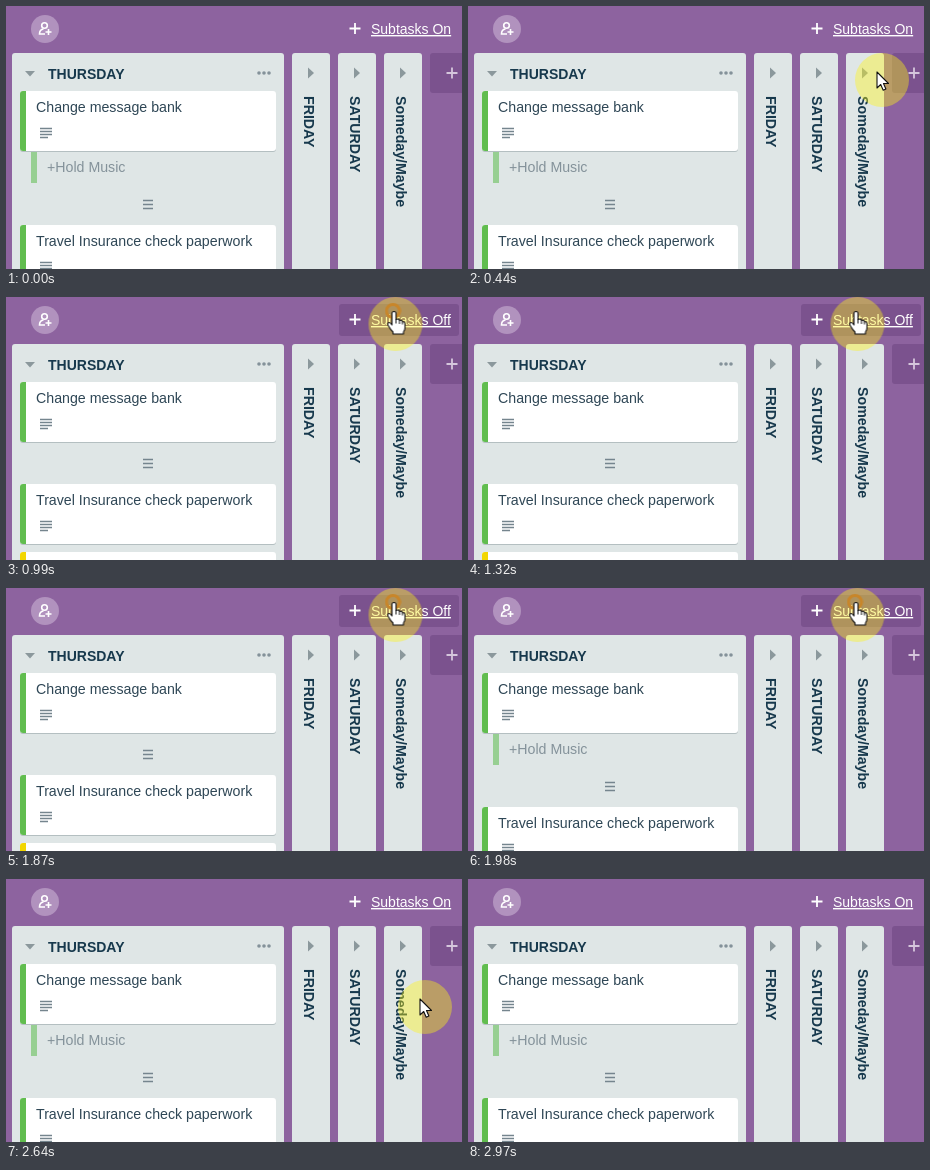
Animation, 456 px wide and 263 px high, one loop 3070 ms. Source, as an HTML page:

```html
<!DOCTYPE html>
<html lang="en">
<head>
<meta charset="utf-8">
<title>Task board</title>
<style>
  html, body { margin: 0; width: 100%; height: 100%; overflow: hidden; background: #8d639f; }
  svg { display: block; width: 456px; height: 263px; }
  text { font: 14.2px "Liberation Sans", Arial, sans-serif; fill: #2f4756; }
  .title { font-weight: bold; font-size: 14px; fill: #17394d; }
  .side { font-weight: bold; fill: #17394d; }
  .menu { font-size: 14px; fill: #fff; text-decoration: underline; }
  .panel { fill: #dfe6e6; }
  .muted { fill: #84929a; }
  .arrowhead { fill: #8b989c; }
  .lines { stroke: #75858e; stroke-width: 1.4; fill: none; }

  .anim { animation: 3070ms step-end infinite; }
  .cursor { animation-name: move; }
  .arrow { animation-name: arrow; }
  .hand, .hover { animation-name: hover; }
  .ring { animation-name: click; }
  .on { animation-name: on; }
  .off { animation-name: off; }
  .below { animation-name: collapse; }

  @keyframes move {
    0% { transform: translate(448px, 127px); visibility: hidden; }
    7.16% { transform: translate(448px, 127px); visibility: visible; }
    10.74% { transform: translate(432px, 101px); }
    14.33% { transform: translate(414px, 74px); }
    17.91% { transform: translate(399px, 46px); }
    21.49% { transform: translate(388px, 27px); }
    28.66% { transform: translate(389.5px, 27px); }
    78.82% { transform: translate(390px, 35px); }
    82.41% { transform: translate(399px, 69px); }
    85.99% { transform: translate(419px, 128px); }
    89.57% { transform: translate(452px, 198px); }
    93.16% { transform: translate(482px, 212.5px); visibility: visible; }
    96.74%, 100% { transform: translate(482px, 212.5px); visibility: hidden; }
  }
  @keyframes arrow {
    0%, 82.41%, 100% { opacity: 1; }
    21.49% { opacity: 0; }
  }
  @keyframes hover {
    0%, 82.41%, 100% { opacity: 0; }
    21.49% { opacity: 1; }
  }
  @keyframes click {
    0%, 42.99%, 71.66%, 100% { opacity: 0; }
    28.66%, 57.32% { opacity: 1; }
  }
  @keyframes on {
    0%, 64.49%, 100% { opacity: 1; }
    32.24% { opacity: 0; }
  }
  @keyframes off {
    0%, 64.49%, 100% { opacity: 0; }
    32.24% { opacity: 1; }
  }
  @keyframes collapse {
    0%, 64.49%, 100% { transform: translateY(0); }
    32.24% { transform: translateY(-32px); }
  }
</style>
</head>
<body>
<svg viewBox="0 0 456 263">
  <defs>
    <g id="card">
      <rect y="1" width="256" height="60" rx="3" fill="#b4bfc1"/>
      <rect width="256" height="60" rx="3" fill="#fff"/>
      <path d="M6 0H3Q0 0 0 3V57Q0 60 3 60H6Z"/>
    </g>
    <path id="notes" class="lines" d="M20 37.5h12M20 40.5h12M20 43.5h12M20 46.5h8"/>
    <g id="strip">
      <rect class="panel" width="38" height="230" rx="3"/>
      <path class="arrowhead" d="M16 14.5v11l6-5.5z"/>
    </g>
  </defs>

  <rect width="456" height="263" fill="#8d639f"/>

  <!-- top bar -->
  <circle cx="39" cy="23" r="14" fill="#b192be"/>
  <g fill="none" stroke="#fff" stroke-width="1.6">
    <circle cx="38.5" cy="19.5" r="2.8"/>
    <path d="M39 28h-5.500q0-4.500 4-5M42.500 23v6M39.500 26h6"/>
  </g>
  <rect class="anim hover" x="333" y="7" width="120" height="32" rx="3" fill="#7b528e"/>
  <path d="M349 17v11M343.500 22.500h11" stroke="#fff" stroke-width="1.8"/>
  <text class="menu anim on" x="365" y="28">Subtasks On</text>
  <text class="menu anim off" x="365" y="28">Subtasks Off</text>

  <!-- open list -->
  <rect class="panel" x="6" y="47" width="272" height="230" rx="3"/>
  <path class="arrowhead" d="M19 65h10l-5 5.500z"/>
  <text class="title" x="42" y="73">THURSDAY</text>
  <g class="muted">
    <circle cx="253" cy="67" r="1.8"/><circle cx="258" cy="67" r="1.8"/><circle cx="263" cy="67" r="1.8"/>
  </g>
  <g class="anim on">
    <rect x="25" y="146" width="6" height="31" fill="#97cf92"/>
    <text class="muted" x="41" y="166">+Hold Music</text>
  </g>
  <g transform="translate(14 85)">
    <use href="#card" fill="#61bd4f"/>
    <use href="#notes"/>
    <text x="16" y="21">Change message bank</text>
  </g>
  <g class="anim below">
    <path class="lines" d="M137 194.500h10M137 198.500h10M137 202.500h10"/>
    <g transform="translate(14 219)">
      <use href="#card" fill="#61bd4f"/>
      <use href="#notes"/>
      <text x="16" y="21">Travel Insurance check paperwork</text>
    </g>
    <use href="#card" x="14" y="287" fill="#f2d600"/>
  </g>

  <!-- collapsed lists -->
  <use href="#strip" x="286" y="47"/>
  <use href="#strip" x="332" y="47"/>
  <use href="#strip" x="378" y="47"/>
  <text class="side" transform="translate(298 90) rotate(90)">FRIDAY</text>
  <text class="side" transform="translate(344 90) rotate(90)">SATURDAY</text>
  <text class="side" transform="translate(390 90) rotate(90)">Someday/Maybe</text>
  <rect x="424" y="47" width="40" height="40" rx="3" fill="#7b528e"/>
  <path d="M446 61.500v11M440.500 67h11" stroke="#d5c6dc" stroke-width="1.8"/>

  <!-- pointer -->
  <g class="anim cursor">
    <circle r="27" fill="#fff514" fill-opacity=".4"/>
    <circle class="anim ring" cx="-2.500" cy="-13" r="6.500" fill="none" stroke="#c8862a" stroke-width="3"/>
    <g fill="#fff" stroke="#111" stroke-width="1.1" stroke-linejoin="round">
      <path class="anim arrow" d="M-5-8V8l3.700-3.500L1.200 10.200l2.700-1.200L1.500 3.500H6.500z"/>
      <path class="anim hand" d="M-3.500-10.500Q-3.500-12.500-1.500-12.500T.5-10.500V-4.500Q3-6 4-3.500Q6.500-4.500 7-2.200Q9.500-2.800 9.500 0V4Q9.500 6 8 8V10H-2.500V8Q-5 5.500-7 2Q-8.500-.5-7-1.300Q-5.300-2-3.500 1Z"/>
    </g>
    <path class="anim hand" d="M.5-4.500v4M4-3v3M7-2v2.500" stroke="#111" fill="none"/>
  </g>
</svg>
</body>
</html>
```
